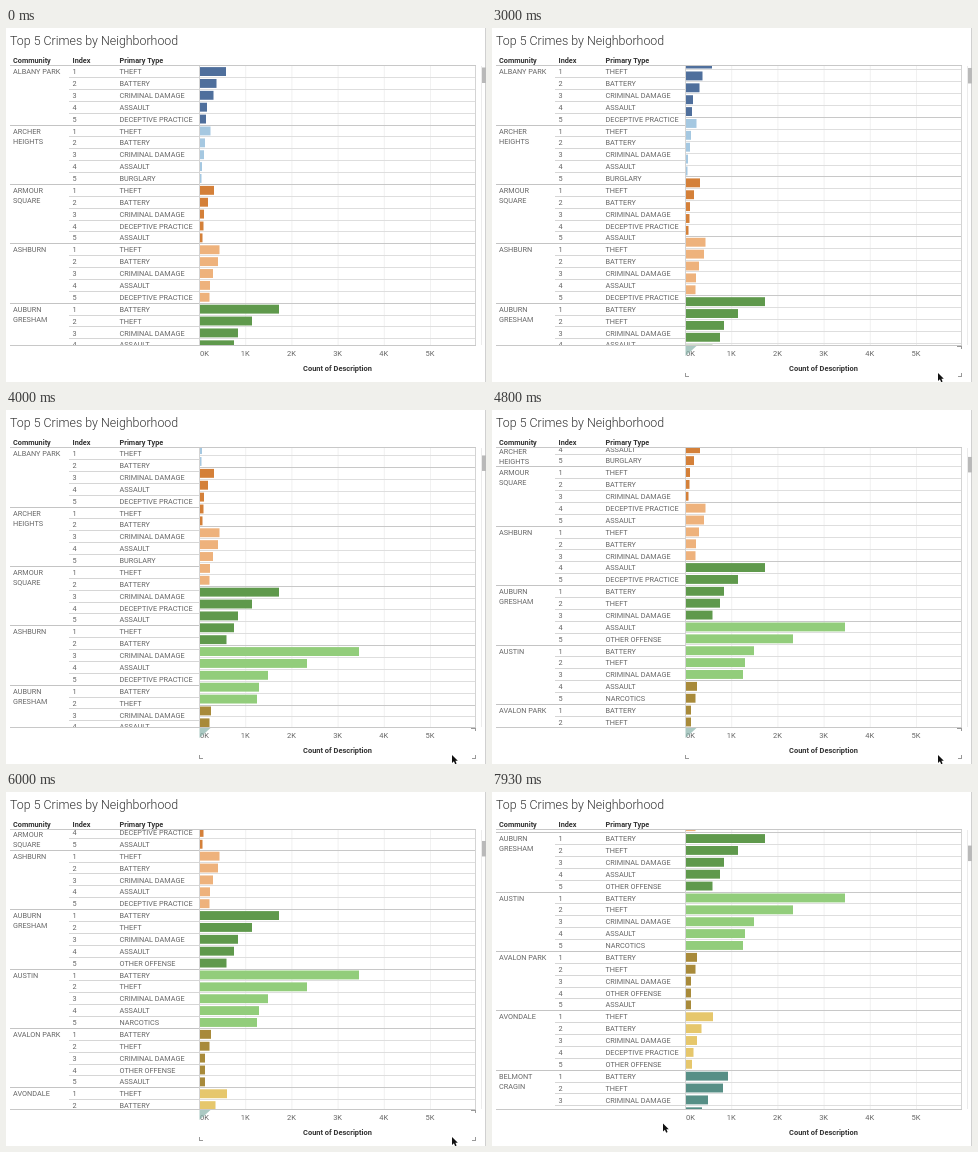
Recreate the animation shown at these times as an HTML page with a canvas. Size 480 by 354 pixels, loop 8000 ms.

```html
<!DOCTYPE html>
<html lang="en">
<head>
<meta charset="utf-8">
<title>Top 5 Crimes by Neighborhood</title>
<style>
  html, body { margin: 0; width: 100%; height: 100%; overflow: hidden; background: #fff; }
  canvas { display: block; width: 480px; height: 354px; }
</style>
</head>
<body>
<canvas id="stage"></canvas>
<script>
const LOOP = 8000, FPS = 15;
const ROW = 11.88, TOP = 38, BOTTOM = 317, LEFT = 193.5, RIGHT = 470;
const FONT = 'Roboto, "Open Sans", sans-serif';

const TYPES = {
  T: 'THEFT', B: 'BATTERY', C: 'CRIMINAL DAMAGE', A: 'ASSAULT', D: 'DECEPTIVE PRACTICE',
  U: 'BURGLARY', O: 'OTHER OFFENSE', N: 'NARCOTICS'
};

// name lines, crime types in rank order, bar colour, bar lengths in pixels
const GROUPS = [
  ['ALBANY PARK', 'TBCAD', '#4f6f9c', [26.5, 17, 14, 7.5, 6.5]],
  ['ARCHER|HEIGHTS', 'TBCAU', '#a5c8e1', [11, 5.5, 4.5, 2.5, 2]],
  ['ARMOUR|SQUARE', 'TBCDA', '#d48039', [14.5, 8.5, 4.5, 4, 3]],
  ['ASHBURN', 'TBCAD', '#eeb27c', [20, 18.5, 13.5, 10.5, 10]],
  ['AUBURN|GRESHAM', 'BTCAO', '#5f994c', [79.5, 52.5, 38.5, 34.5, 27]],
  ['AUSTIN', 'BTCAN', '#92cd7b', [159.5, 107.5, 68.5, 59.5, 57.5]],
  ['AVALON PARK', 'BTCOA', '#a88a3a', [11.5, 10, 5.5, 5.5, 5.5]],
  ['AVONDALE', 'TBCDO', '#e6c76c', [27.5, 16, 11.5, 8, 6.5]],
  ['BELMONT|CRAGIN', 'BTCAD', '#578f86', [42.5, 37.5, 22.5, 16.5, 14]]
].map(([name, types, color, bars]) => ({ lines: name.split('|'), types, color, bars }));

// [time, offset] pairs; the bars glide, the labels catch up in jumps
const BAR_SCROLL = [
  [2800, 0], [3000, 7.5], [3250, 38], [3533, 71.3], [3750, 91], [4000, 99], [4130, 99.6],
  [4550, 99.6], [4800, 123.6], [5000, 145], [5200, 156], [5330, 157.6],
  [6130, 157.6], [6200, 163], [6400, 195], [6600, 226], [6733, 233], [6930, 234.6]
];
const LABEL_JUMPS = [[0, 0], [4200, 99.6], [5330, 157.6], [7000, 234.6]];
const CURSOR_X = [[7050, 446], [7250, 405], [7550, 260], [7750, 185], [7870, 171]];
const CURSOR_Y = [[2530, 351], [2600, 345], [7050, 345], [7870, 331.5]];

function track(keys, t) {
  if (t <= keys[0][0]) return keys[0][1];
  for (let i = 1; i < keys.length; i++) {
    const [t0, a] = keys[i - 1], [t1, b] = keys[i];
    if (t <= t1) return a + (b - a) * (t - t0) / (t1 - t0);
  }
  return keys[keys.length - 1][1];
}
const step = (keys, t) => keys.filter(k => k[0] <= t).pop()[1];

const canvas = document.getElementById('stage');
const ctx = canvas.getContext('2d');
const ratio = window.devicePixelRatio || 1;
canvas.width = 480 * ratio;
canvas.height = 354 * ratio;

function text(str, x, y, { size = 7.3, weight = 400, color = '#666', align = 'left' } = {}) {
  ctx.font = `${weight} ${size}px ${FONT}`;
  ctx.fillStyle = color;
  ctx.textAlign = align;
  ctx.fillText(str, x, y + size * 0.36);
}
function rect(x, y, w, h, color) {
  ctx.fillStyle = color;
  ctx.fillRect(x, y, w, h);
}
const hline = (x0, x1, y, color) => rect(x0, Math.round(y), x1 - x0, 1, color);
const vline = (x, y0, y1, color) => rect(x, y0, 1, y1 - y0, color);

function clipped(x, w, draw) {
  ctx.save();
  ctx.beginPath();
  ctx.rect(x, TOP, w, BOTTOM - TOP);
  ctx.clip();
  draw();
  ctx.restore();
}

function drawLabels(scroll) {
  GROUPS.forEach(({ lines, types }, g) => {
    const top = TOP - 0.4 + g * 5 * ROW - scroll, bottom = top + 5 * ROW;
    const first = Math.min(Math.max(top, TOP - 0.4) + 5.9, bottom - 5.7 - 10 * (lines.length - 1));
    lines.forEach((line, i) => text(line, 7, first + 10 * i));
    [...types].forEach((type, i) => {
      const y = top + (i + 0.5) * ROW;
      text(i + 1, 66.5, y);
      text(TYPES[type], 113.5, y);
      hline(i < 4 ? 63 : 4, LEFT, top + (i + 1) * ROW - 0.5, i < 4 ? '#d6d6d6' : '#c4c4c4');
    });
  });
}

function drawBars(scroll) {
  for (let k = 1; k < 6; k++) vline(193 + 46.2 * k, TOP, BOTTOM, '#f1f1f1');
  GROUPS.forEach(({ color, bars }, g) => bars.forEach((length, i) => {
    const y = TOP - 0.4 + (g * 5 + i) * ROW - scroll;
    hline(LEFT, RIGHT, y + ROW - 0.5, i < 4 ? '#dedede' : '#c8c8c8');
    rect(LEFT, y + 1.5, length, 8.9, color);
  }));
}

function drawAxis() {
  ['0K', '1K', '2K', '3K', '4K', '5K'].forEach((label, k) =>
    text(label, k ? 193 + 46.2 * k : 198.5, 325.5, { size: 7.5, align: 'center' }));
  text('Count of Description', 331.5, 340, { size: 7.45, weight: 700, color: '#333', align: 'center' });
}

function drawAxisHandles() {
  ctx.fillStyle = 'rgba(135, 178, 170, .7)';
  ctx.beginPath();
  ctx.moveTo(193.5, 318);
  ctx.lineTo(204.5, 318);
  ctx.lineTo(193.5, 328);
  ctx.fill();
  hline(465, 470, 318, '#999');
  vline(469, 318, 321, '#999');
  hline(193, 197, 348, '#999');
  vline(193, 345, 348, '#999');
  hline(466, 470, 348, '#999');
  vline(469, 345, 348, '#999');
}

function drawCursor(x, y) {
  const outline = [[0, 0], [0, 8], [1.9, 6.3], [3.2, 9.2], [4.6, 8.6], [3.4, 5.8], [5.8, 5.7]];
  ctx.beginPath();
  outline.forEach(([dx, dy]) => ctx.lineTo(x + dx, y + dy));
  ctx.closePath();
  ctx.lineWidth = 1.2;
  ctx.strokeStyle = '#fff';
  ctx.stroke();
  ctx.fillStyle = '#111';
  ctx.fill();
}

function draw(t) {
  const barScroll = track(BAR_SCROLL, t);
  ctx.setTransform(ratio, 0, 0, ratio, 0, 0);
  rect(0, 0, 480, 354, '#fff');

  text('Top 5 Crimes by Neighborhood', 4, 12.5, { size: 12.4, weight: 300, color: '#333' });
  [['Community', 7], ['Index', 66.5], ['Primary Type', 113.5]].forEach(([label, x]) =>
    text(label, x, 32.3, { weight: 700, color: '#333' }));

  clipped(0, LEFT, () => drawLabels(step(LABEL_JUMPS, t)));
  clipped(LEFT, RIGHT - LEFT, () => drawBars(barScroll));
  hline(4, RIGHT, 37, '#c8c8c8');
  hline(4, RIGHT, BOTTOM, '#c8c8c8');
  vline(193, TOP, BOTTOM, '#d4d4d4');
  vline(469, TOP, BOTTOM, '#d4d4d4');

  vline(475, TOP, BOTTOM, '#ebebeb');
  vline(479, 0, 354, '#d0d0d0');
  rect(476, 39.5 + barScroll * 0.06, 4, 15.5, '#b9b9b9');

  drawAxis();
  if (t >= 2530) {
    const x = track(CURSOR_X, t);
    if (x > LEFT) drawAxisHandles();
    drawCursor(x, track(CURSOR_Y, t));
  }
}

const start = performance.now();
function tick() {
  const t = (performance.now() - start) % LOOP;
  // hold each picture for one frame; the margin absorbs rounding of frame times
  draw(Math.floor((t + 5) * FPS / 1000) * 1000 / FPS);
  requestAnimationFrame(tick);
}
tick();
</script>
</body>
</html>
```
